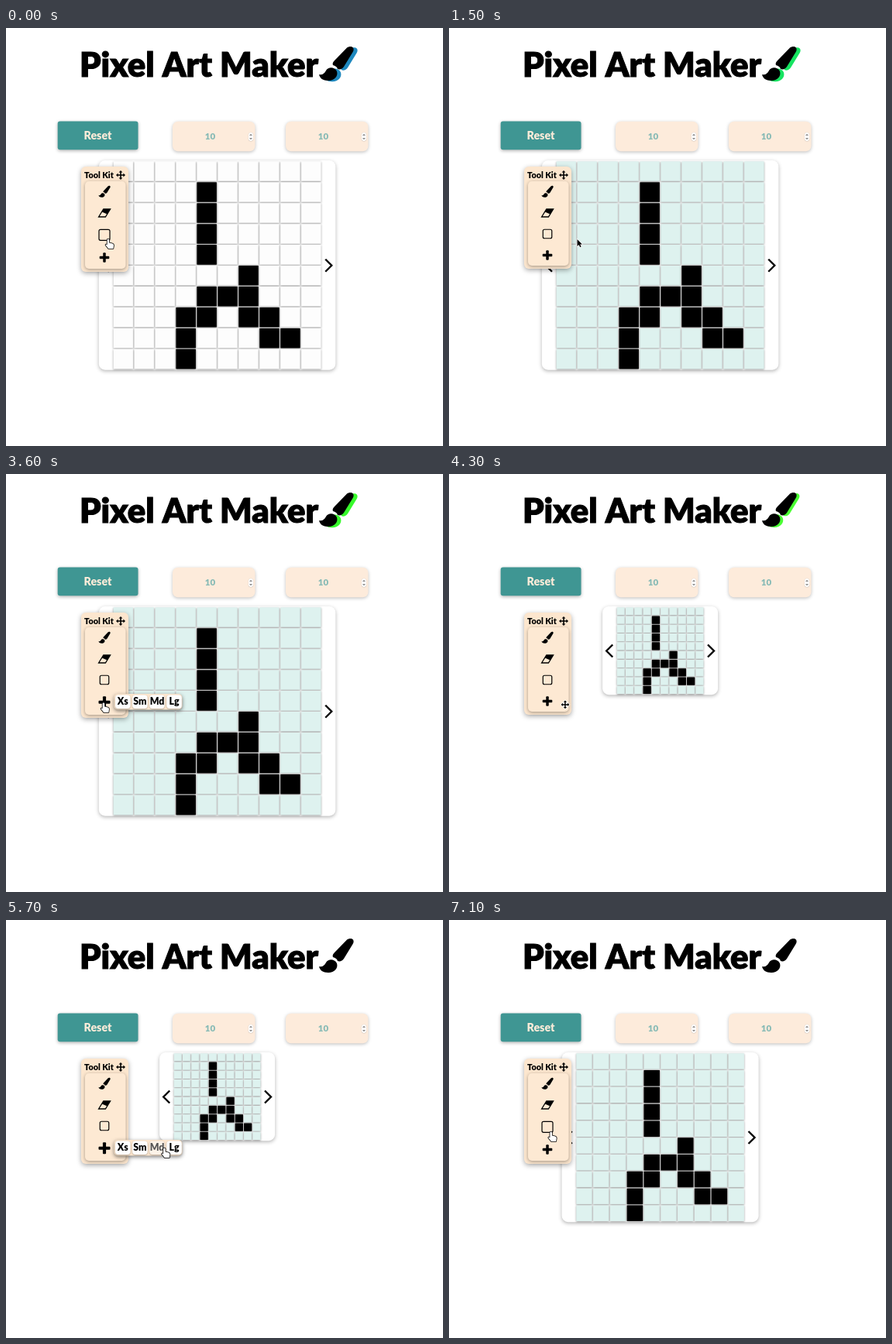
Recreate the animation shown at these times as an HTML page with a canvas. Size 564 by 540 pixels, loop 7200 ms.

```html
<!DOCTYPE html>
<html lang="en">
<head>
<meta charset="utf-8">
<title>Pixel Art Maker</title>
<style>
  html, body { margin: 0; width: 100%; height: 100%; overflow: hidden; background: #fff; }
  canvas { display: block; }
</style>
</head>
<body>
<canvas id="stage" width="564" height="540"></canvas>
<script>
const ctx = document.getElementById('stage').getContext('2d');
const LOOP = 7200, STEP = 100;
const CREAM = '#fce6ce', PANEL = '#fde9d3', TEAL = '#3f9693';

const brush = new Path2D(
  'M447.5 25C449.5 27 448.5 30 447 32L436 50C434 53 431 54 428 53C427 50 425 49 422 48C421 46 422 44 424 42L440 25.5C442.5 23.5 446 23.5 447.5 25Z' +
  'M404 60C408 61 411 59 413 55C416 50 424 50 427 56C429 62 424 68 416 68C409 68 405 65 404 60Z');
const hand = new Path2D('M-1.4 7V.8a1.3 1.3 0 0 1 2.6 0V4.6l4.2 1q1.8.6 1.6 2.4L6.4 12H.2L-3.4 7.6q-.4-1.8 2-.6z');
const arrow = new Path2D('M0 0V10.5L2.5 8.2 4.3 12 6 11.2 4.3 7.6H7.6Z');
const move = new Path2D('M0-6L2.4-3.4H.8V-.8H3.4V-2.4L6 0 3.4 2.4V.8H.8V3.4H2.4L0 6-2.4 3.4H-.8V.8H-3.4V2.4L-6 0-3.4-2.4V-.8H-.8V-3.4H-2.4Z');

// The drawing, as brush strokes in cell coordinates
const strokes = new Path2D('M4 1V4M3 9V7H4V6H6M6 5V7H7V8H8');
const cellSizes = { xs: 11.3, md: 21.8, lg: 26.95 };
const swatches = ['#ffffff', '#d8f1ef', '#dff1ea', '#f9e3dc', '#d0d4d0', '#fbe3bc', '#f3e3f0', '#fdeec0'];

// Where the pointer stops: at each time, it has arrived at a place
const onSquare = [132, 273], onSwatch = [157, 272.5], onBoard = [165.5, 273];
const onPlus = [126, 296], onXs = [151, 298], onMd = [204.5, 295];
const stops = [
  [0, onSquare], [700, onSwatch], [1500, onBoard], [2600, onPlus], [3600, onPlus],
  [4200, onXs], [5000, onPlus], [5600, onMd], [5800, onMd], [6400, onPlus], [LOOP, onSquare]
];

const clamp = (v, low, high) => Math.min(high, Math.max(low, v));
const between = (t, from, to) => t >= from && t < to;

function pointerAt(t) {
  const next = stops.findIndex(([time]) => time > t);
  const [startTime, from] = stops[next - 1], [endTime, to] = stops[next];
  const k = (t - startTime) / (endTime - startTime);
  const eased = k * k * (3 - 2 * k);
  return from.map((v, i) => v + (to[i] - v) * eased);
}

function popupAt(t) {
  if (between(t, 200, 1300)) return 'palette';
  if (between(t, 2900, 4200) || between(t, 4900, 5900)) return 'sizes';
  return '';
}

function hoveredTool(popup, x, y) {
  if (popup) return popup === 'palette' ? 'square' : 'plus';
  if (Math.abs(x - 127) > 15) return '';
  return y < 285 ? 'square' : 'plus';
}

function box(x, y, w, h, radius, fill, shadow = 0, alpha = 0.3) {
  ctx.save();
  if (shadow) {
    ctx.shadowColor = `rgba(0,0,0,${alpha})`;
    ctx.shadowBlur = shadow;
    ctx.shadowOffsetY = shadow / 3;
  }
  ctx.fillStyle = fill;
  ctx.beginPath();
  ctx.roundRect(x, y, w, h, radius);
  ctx.fill();
  ctx.restore();
}

function label(text, x, y, size, fill = '#000') {
  ctx.font = `900 ${size}px Lato, sans-serif`;
  ctx.textAlign = 'center';
  ctx.fillStyle = fill;
  ctx.fillText(text, x, y);
}

function shape(path, x, y, scale, fill, outline) {
  ctx.save();
  ctx.translate(x, y);
  ctx.scale(scale, scale);
  if (outline) {
    ctx.strokeStyle = outline;
    ctx.lineWidth = 1.6;
    ctx.lineJoin = 'round';
    ctx.stroke(path);
  }
  ctx.fillStyle = fill;
  ctx.fill(path);
  ctx.restore();
}

function line(path, width) {
  ctx.strokeStyle = '#000';
  ctx.lineWidth = width;
  ctx.stroke(new Path2D(path));
}

function drawHeader(t) {
  label('Pixel Art Maker', 249, 63, 43.5);
  ctx.strokeStyle = '#000';
  ctx.lineWidth = 1;
  ctx.strokeText('Pixel Art Maker', 249, 63);

  // The glow drifts from blue to green, then slides behind the brush
  const hue = 108 + 92 * Math.exp(-t / 1500);
  const offset = clamp((5600 - t) / 340, 0, 5);
  if (offset) shape(brush, offset, offset / 4, 1, `hsl(${hue},${73 + t / 160}%,${43 + t / 250}%)`);
  shape(brush, 0, 0, 1, '#000');

  box(66.7, 120.5, 103.8, 36.8, 3, TEAL, 4);
  label('Reset', 118.5, 144, 14.2, '#fdecd9');
  for (const x of [215, 361]) {
    box(x, 120.7, 106.5, 38.5, 7, '#fdebdb', 4, 0.25);
    label('10', x + 48.5, 144, 11.5, '#86bab5');
    box(x + 98, 135, 6, 11, 3, '#fff', 1);
    line(`M${x + 99.7} 139l1.3-1.5 1.3 1.5m-2.6 3l1.3 1.5 1.3-1.5`, 0.7);
  }
}

function drawBoard(size, background) {
  const cell = cellSizes[size], span = cell * 10, inset = 0.4 + cell * 0.012;
  const left = 272.6 - span / 2, top = 171.6, middle = top + span / 2 + 0.4;
  box(left - 18, top - 0.6, span + 36, span + 1.2, 8, '#fff', 5, 0.3);
  for (let row = 0; row < 10; row++) {
    for (let col = 0; col < 10; col++) {
      ctx.lineWidth = 0.4;
      ctx.lineCap = 'square';
      const fill = ctx.isPointInStroke(strokes, col, row) ? '#000' : background;
      box(left + col * cell + inset, top + row * cell + inset, cell - 2 * inset, cell - 2 * inset, 0.3, fill, 2.5, 0.42);
    }
  }
  ctx.lineCap = 'butt';
  line(`M${left - 4.9} ${middle - 8}l-8 8 8 8`, 2.4);
  line(`M${left + span + 4.9} ${middle - 8}l8 8-8 8`, 2.4);
}

function drawToolkit(hovered) {
  const grow = hovered ? 4 : 0;
  box(97, 179, 61, 132 + grow, 6, CREAM, 6, 0.35);
  label('Tool Kit', 120, 193.5, 10.8);
  shape(move, 148, 190, 1, '#000');
  box(102, 198, 52.5, 109 + grow, 5, PANEL, 4, 0.35);

  shape(brush, 127 - 426 * 0.34, 211.5 - 46.5 * 0.34, 0.34, '#000');

  line('M125.8 234H134.6L128.4 244H119.6Z', 1.3);
  ctx.fillStyle = '#000';
  ctx.fill(new Path2D('M125.8 234H134.6L130.6 240.4 123.6 237.5Z'));

  const square = hovered === 'square' ? 14 : 11.5;
  const squareY = hovered === 'square' ? 267.3 : 266;
  ctx.beginPath();
  ctx.roundRect(127 - square / 2, squareY - square / 2, square, square, 2);
  ctx.lineWidth = 1.2;
  ctx.stroke();

  const arm = hovered === 'plus' ? 7.5 : 6.3, thick = arm * 0.55;
  const plusY = { square: 296.5, plus: 294.8 }[hovered] || 293.5;
  box(127 - arm, plusY - thick / 2, arm * 2, thick, 1, '#000');
  box(127 - thick / 2, plusY - arm, thick, arm * 2, 1, '#000');
}

function drawPopup(kind, pointerX) {
  if (kind === 'palette') {
    box(140, 256.5, 141, 29.5, 4, PANEL, 5, 0.4);
    swatches.forEach((color, i) => box(141 + i * 17.5, 262.5, 15.5, 16, 3, color));
  } else if (kind === 'sizes') {
    box(139.5, 284, 88, 20.5, 5, CREAM, 5, 0.5);
    ['Xs', 'Sm', 'Md', 'Lg'].forEach((name, i) => {
      const x = 141 + i * 22.1;
      const active = between(pointerX, x, x + 20);
      box(x, 285.5, 19.5, 17.5, 4, active ? '#fdf3e8' : '#fff', 2);
      label(name, x + 9.8, 298.3, 12.3, active ? '#555' : '#000');
    });
  }
}

function drawPointer(hovered, x, y) {
  if (hovered) shape(hand, x, y, 1, '#fff', '#000');
  else if (x < 158) shape(move, x, y, 0.9, '#000', '#fff');
  else shape(arrow, x, y, 0.85, '#000', '#fff');
}

function render(now) {
  const t = Math.floor((now % LOOP) / STEP) * STEP;
  const [x, y] = pointerAt(t);
  const popup = popupAt(t);
  const hovered = hoveredTool(popup, x, y);
  const size = t < 4100 ? 'lg' : t < 5800 ? 'xs' : 'md';
  ctx.fillStyle = '#fff';
  ctx.fillRect(0, 0, 564, 540);
  drawHeader(t);
  drawBoard(size, t < 1000 ? '#fdfdfd' : '#def2ef');
  drawToolkit(hovered);
  drawPopup(popup, x);
  drawPointer(hovered, x, y);
}

const start = performance.now();
function tick() {
  render(performance.now() - start);
  requestAnimationFrame(tick);
}
tick();
</script>
</body>
</html>
```
